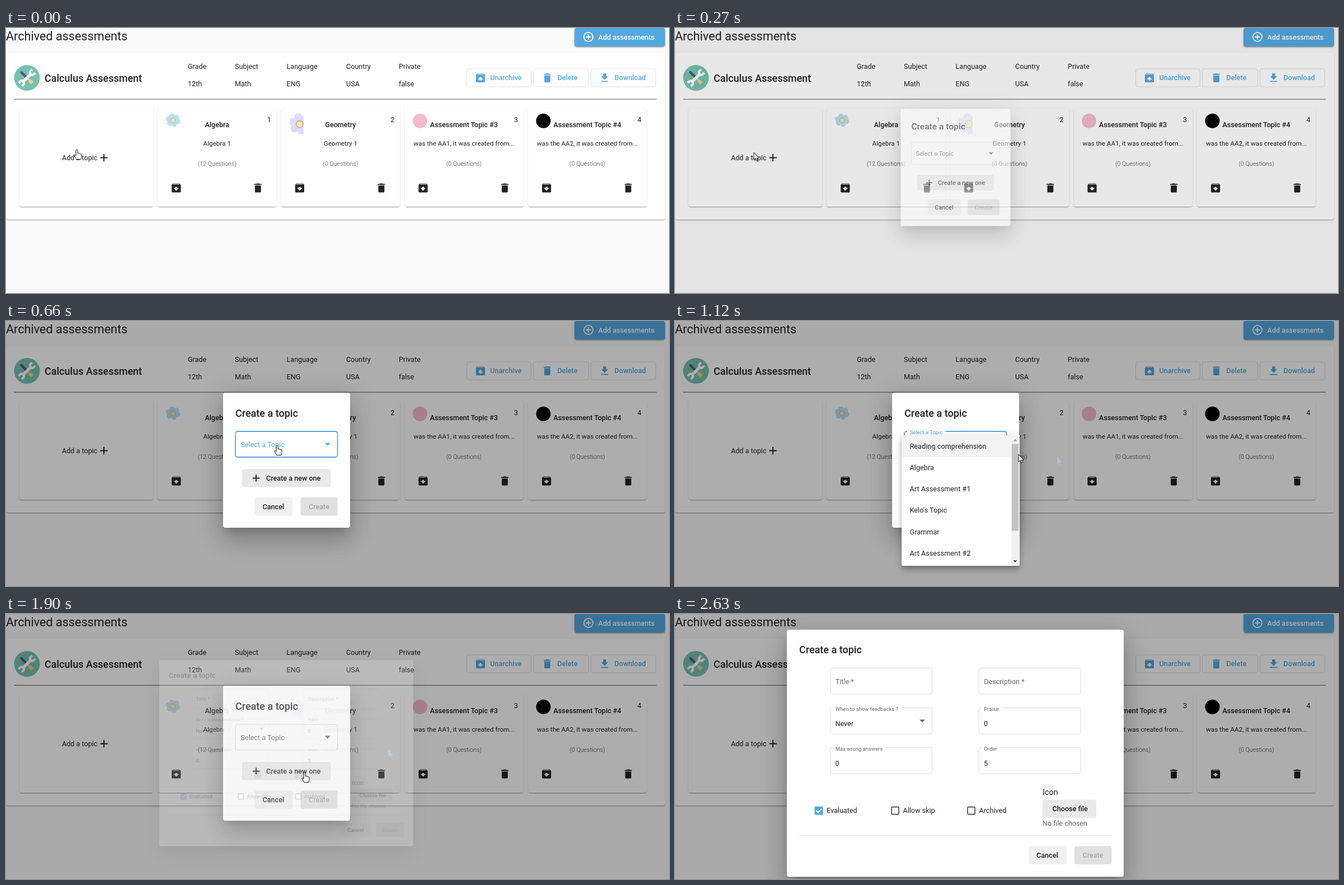
Recreate the animation shown at these times as an HTML page. Size 1185 by 473 pixels, loop 2.69 s.

```html
<!DOCTYPE html>
<html lang="en">
<head>
<meta charset="utf-8">
<title>Create a topic</title>
<style>
html, body { margin: 0; width: 100%; height: 100%; overflow: hidden; background: #fafafa; }
#stage { position: relative; width: 1185px; height: 473px; overflow: hidden; background: #fafafa; }
.box, .layer, svg { position: absolute; }
.layer { inset: 0; }
svg { left: 0; top: 0; overflow: visible; }
text { font-family: Roboto, "Liberation Sans", Arial, sans-serif; white-space: pre; }
.box { border-radius: 4px; background: #fff; }
.card { box-shadow: 0 2px 1px -1px #0003, 0 1px 1px #00000024, 0 1px 3px #0000001f; }
.raised { background: #54a8e0; box-shadow: 0 3px 1px -2px #0003, 0 2px 2px #00000024, 0 1px 5px #0000001f; }
.dialog { box-shadow: 0 11px 15px -7px #0003, 0 24px 38px 3px #00000024, 0 9px 46px 8px #0000001f; }
.panel { border-radius: 0 0 4px 4px; transform-origin: 50% 0;
  box-shadow: 0 5px 5px -3px #0003, 0 8px 10px 1px #00000024, 0 3px 14px 2px #0000001f; }
#shade { background: #000; }
</style>
</head>
<body>
<div id="stage"></div>
<script>
const BLUE = '#54a8e0', INK = '#212121', GREY = '#666';
const CRATE = 'M20.54 5.23l-1.39-1.68C18.88 3.21 18.47 3 18 3H6c-.47 0-.88.21-1.16.55L3.46 5.23C3.17 5.57 3 6.02 3 6.5V19c0 1.1.9 2 2 2h14c1.1 0 2-.9 2-2V6.5c0-.48-.17-.93-.46-1.27zM5.12 5l.81-1h12l.94 1H5.12z';
const ICONS = {
  archive: CRATE + 'M12 17.5L6.5 12H10v-2h4v2h3.5z',
  unarchive: CRATE + 'M12 9.5l5.5 5.5H14v2h-4v-2H6.5z',
  bin: 'M6 19c0 1.1.9 2 2 2h8c1.1 0 2-.9 2-2V7H6zM19 4h-3.5l-1-1h-5l-1 1H5v2h14z',
  download: 'M19 9h-4V3H9v6H5l7 7zM5 18v2h14v-2z',
  plus: 'M19 13h-6v6h-2v-6H5v-2h6V5h2v6h6z',
  plusRing: 'M13 7h-2v4H7v2h4v4h2v-4h4v-2h-4zM12 2a10 10 0 1 0 0 20 10 10 0 0 0 0-20zm0 18a8 8 0 1 1 0-16 8 8 0 0 1 0 16z'
};

// Markup helpers, all in stage coordinates
const text = (x, y, s, { size = 12.6, weight = 400, fill = INK, anchor = 'start', extra = '' } = {}) =>
  `<text x="${x}" y="${y}" font-size="${size}" font-weight="${weight}" fill="${fill}" text-anchor="${anchor}" ${extra}>${s}</text>`;
const rect = (x, y, w, h, fill, extra = 'rx="4"') =>
  `<rect x="${x}" y="${y}" width="${w}" height="${h}" fill="${fill}" ${extra}/>`;
const outline = (x, y, w, h, stroke = '#dcdcdc') => rect(x, y, w, h, 'none', `rx="4" stroke="${stroke}"`);
const circle = (x, y, r, fill, extra = '') => `<circle cx="${x}" cy="${y}" r="${r}" fill="${fill}" ${extra}/>`;
const icon = (name, x, y, fill = INK, k = .9) =>
  `<path transform="translate(${x} ${y}) scale(${k}) translate(-12 -12)" fill="${fill}" fill-rule="evenodd" d="${ICONS[name]}"/>`;
const button = (x, y, w, tx, label, bg, fill = INK) =>
  rect(x, y, w, 32.5, bg) + text(tx, y + 20.7, label, { weight: 500, fill });
const caret = (x, y, extra = '') => `<path d="M${x - 5} ${y}h10l-5 5z" fill="${GREY}" ${extra}/>`;
const box = (cls, x, y, w, h, id = '', inner = '') =>
  `<div class="box ${cls}" ${id && `id="${id}"`} style="left:${x}px;top:${y}px;width:${w}px;height:${h}px">` +
  (inner && `<svg width="${w}" height="${h}" viewBox="${x} ${y} ${w} ${h}">${inner}</svg>`) + '</div>';
const svg = (inner, id = '') => `<svg ${id && `id="${id}"`} width="1185" height="473">${inner}</svg>`;

function flower(x, y, r, petal, squash) {
  let s = '';
  for (let i = 0; i < 6; i++) {
    const a = i * Math.PI / 3 + .3;
    s += circle(x + r * Math.cos(a), y + r * squash * Math.sin(a), r * .56, petal);
  }
  return s + circle(x, y, r * .8, petal) + circle(x, y + .5, r * .5, '#f8e6ae', `stroke="#b9a78f" stroke-width="${r * .12}"`);
}

function tools() {
  return circle(37.5, 89, 23, '#76c2af') + `<g transform="translate(37.5 89)" stroke-linecap="round" fill="none">
    <g transform="rotate(-45)">
      <path d="M0-14V-1" stroke="#4f5d73" stroke-width="4.5"/><path d="M0-1V6" stroke="#e0e0d1" stroke-width="2"/>
      <path d="M0 6V14" stroke="#f5cf87" stroke-width="6" stroke-linecap="butt"/>
    </g>
    <g transform="rotate(45)" stroke="#fff">
      <path d="M0-9V9" stroke-width="5"/>
      <path d="M-4-17V-13Q-4-9.500 0-9.500T4-13V-17M-4 17V13Q-4 9.500 0 9.500T4 13V17" stroke-width="4" stroke-linecap="butt"/>
    </g></g>`;
}

function page() {
  const facts = [[325, 'Grade', '12th'], [409, 'Subject', 'Math'], [501.5, 'Language', 'ENG'], [608, 'Country', 'USA'], [702, 'Private', 'false']];
  const actions = [[823.5, 115, 'unarchive', 'Unarchive', 24.5, 42], [942.5, 99, 'bin', 'Delete', 25, 43], [1045.5, 116, 'download', 'Download', 24.5, 42]];
  const cards = [['Algebra', 'Algebra 1', 12], ['Geometry', 'Geometry 1', 0],
    ['Assessment Topic #3', 'was the AA1, it was created from...', 0], ['Assessment Topic #4', 'was the AA2, it was created from...', 0]];
  const left = i => 271.3 + i * 220.6;
  let boxes = box('raised', 1015.5, 0, 162, 32.5) + box('card', 0, 43.500, 1178, 298.500) + box('card', 24, 143, 239, 176);
  let s = text(0, 22, 'Archived assessments', { size: 21.6 }) + icon('plusRing', 1041, 16, '#fff') +
    text(1058.5, 20.7, 'Add assessments', { weight: 500, fill: '#fff' }) +
    tools() + text(69, 95.5, 'Calculus Assessment', { size: 18, weight: 500 }) +
    rect(14.5, 126.5, 1148.5, 1.500, '#8f8f8f', '') + text(100, 235.5, 'Add a topic') + icon('plus', 175, 231.5, INK, .95);
  for (const [x, head, value] of facts) s += text(x, 73, head) + text(x, 104, value);
  for (const [x, w, name, label, ix, tx] of actions)
    s += outline(x, 73, w, 32, '#e0e0e0') + icon(name, x + ix, 89, BLUE) + text(x + tx, 93.300, label, { weight: 500, fill: BLUE });
  cards.forEach(([head, sub, count], i) => {
    const x = left(i), mid = { anchor: 'middle' };
    boxes += box('card', x, 143, 212, 176);
    s += text(x + 106, 177, head, { ...mid, weight: 500 }) + text(x + 106, 210.3, sub, { ...mid, size: 11.7 }) +
      text(x + 106, 246, `(${count} Questions)`, { ...mid, size: 10.8, weight: 300, fill: '#444' }) +
      text(x + 199, 167.500, i + 1, mid) + icon('archive', x + 33, 285.5) + icon('bin', x + 179, 285.500);
  });
  s += flower(298.5, 164.500, 8.5, '#b8e0f2', .85) +
    '<clipPath id="cut"><path d="M507 153h25v36h-25z"/></clipPath>' +
    `<g clip-path="url(#cut)">${flower(525, 171, 12.5, '#dedcfb', 1)}</g>` +
    circle(740, 165.7, 13, '#f4bbcf') + circle(960.5, 165.7, 13, '#000');
  return `<div class="layer">${boxes}${svg(s)}</div>`;
}

function picker() {
  return box('dialog', 388, 127.5, 226.5, 241.500, 'picker',
    text(410, 170, 'Create a topic', { size: 18, weight: 500 }) +
    rect(410, 196.500, 182.500, 46, 'none', 'id="field" rx="4"') +
    rect(415, 194, 69, 5, '#fff', 'id="notch"') +
    text(0, 0, 'Select a Topic', { extra: 'id="label"' }) + caret(575, 217, 'id="caret"') +
    button(422, 263.500, 158.500, 465, 'Create a new one', '#e9e9e9') + icon('plus', 447, 280) +
    button(444, 314.500, 68, 458.5, 'Cancel', '#f0f0f0') + button(526.500, 314.500, 66, 541, 'Create', '#e0e0e0', '#a6a6a6'));
}

function options() {
  const names = ['Reading comprehension', 'Algebra', 'Art Assessment #1', "Kelo's Topic", 'Grammar', 'Art Assessment #2'];
  return box('panel', 405, 204, 210.500, 233, 'options',
    rect(405, 204, 195.500, 38.500, '#f3f3f3', '') +
    names.map((n, i) => text(419.5, 227.7 + i * 38.25, n, { extra: 'letter-spacing=".08"' })).join('') +
    rect(600.5, 204, 15, 233, '#f1f1f1', '') + rect(602, 219.500, 12, 155, '#c1c1c1', '') +
    '<path d="M604.500 214.500h7l-3.500-4z" fill="#a3a3a3"/><path d="M604.500 427h7l-3.500 4z" fill="#404040"/>');
}

function form() {
  const fields = [[277.5, 96.5, 'Title *'], [543, 96.5, 'Description *'], [277.5, 167.5, 'When to show feedbacks ?', 'Never', 123],
    [543, 167.5, 'Praise', '0', 36], [277.5, 238.500, 'Max wrong answers', '0', 95], [543, 238.500, 'Order', '5', 33]];
  const checks = [[249.5, 'Evaluated'], [386, 'Allow skip'], [522, 'Archived']];
  let s = text(222, 70.3, 'Create a topic', { size: 18, weight: 500 });
  for (const [x, y, label, value, gap] of fields) {
    s += outline(x, y, 182, 46.5);
    s += value
      ? rect(x + 4.5, y - 1, gap, 2, '#fff', '') + text(x + 9.3, y + 5.3, label, { size: 9.45, fill: GREY }) + text(x + 9, y + 32, value)
      : text(x + 9.3, y + 28.6, label, { fill: GREY });
  }
  s += caret(442, 188.5);
  checks.forEach(([x, label], i) => {
    s += i ? rect(x + 1, 344.500, 13, 13, '#fff', 'rx="1.500" stroke="#555" stroke-width="1.800"')
      : rect(x, 343.500, 15, 15, BLUE, 'rx="2"') + `<path d="M${x + 3} 351l3.200 3.200 6.200-6.400" fill="none" stroke="#fff" stroke-width="1.900"/>`;
    s += text(x + 21.5, 355, label);
  });
  return box('dialog', 200, 28, 602, 440.500, 'form', s +
    text(657, 323, 'Icon', { size: 14.4 }) + button(657, 331.500, 96, 674.5, 'Choose file', '#e9e9e9') +
    text(657, 378.3, 'No file chosen', { fill: GREY }) + rect(222, 395, 559, 1, '#e0e0e0', '') +
    button(632, 414.300, 68, 646, 'Cancel', '#f0f0f0') + button(714, 414.300, 66.500, 728.5, 'Create', '#e0e0e0', '#a6a6a6'));
}

const ARROW = 'M0 0V13.500L3.100 10.700 5.200 15.300 7.100 14.500 5.100 10H9.300z';
const HAND = 'M-2 1.500Q-2 0-.5 0T1 1.500V6.500Q3 5.600 3.800 7 5.600 6.300 6.200 7.800 8 7.500 8 9.300V12.500Q8 15 6.600 17.500H-1.200Q-2.500 14.500-5 11.500-5.600 9.600-4 9.600-3 9.800-2 11z';

document.getElementById('stage').innerHTML = page() + '<div class="layer" id="shade"></div>' +
  svg(`<path transform="translate(683 242)" d="${ARROW}" fill="#a9c3d3"/>`, 'trail') +
  picker() + options() + form() +
  svg('<path id="cursor" fill="#fff" stroke="#111" stroke-linejoin="round"/>');

const $ = id => document.getElementById(id);
const [shade, trail, pickerBox, optionBox, formBox, cursor, field, notch, label, arrow] =
  ['shade', 'trail', 'picker', 'options', 'form', 'cursor', 'field', 'notch', 'label', 'caret'].map($);

// Timing
const LOOP = 2690, TICK = LOOP / 41;
const OPEN = 228, FOCUS = 640, EXPAND = 815, COLLAPSE = 1380, SWAP = 1895;

const clamp = v => Math.min(1, Math.max(0, v));
function bezier(x1, y1, x2, y2) {
  const at = (a, b, u) => 3 * a * u * (1 - u) ** 2 + 3 * b * u * u * (1 - u) + u ** 3;
  return x => {
    x = clamp(x);
    if (x === 0 || x === 1) return x;
    let lo = 0, hi = 1;
    for (let i = 0; i < 24; i++) {
      const m = (lo + hi) / 2;
      if (at(x1, x2, m) < x) lo = m; else hi = m;
    }
    return at(y1, y2, lo);
  };
}
const enter = bezier(0, 0, .2, 1), swift = bezier(.25, .8, .25, 1);

// Pointer path: tick, x, y
const PATH = [[0, 127, 217], [1, 131, 210], [2, 141, 221], [4, 141, 222], [5, 150, 223], [7, 330, 232], [9, 452, 229], [10, 485, 222],
  [13, 487, 223], [16, 683, 242], [17, 614, 238], [20, 620, 161], [21, 614, 172], [23, 533, 264], [28, 534, 283], [31, 534, 283],
  [37, 743, 431], [38, 743, 431], [39, 752, 437], [41, 752, 437]];
const isHand = n => n < 4 || (n >= 8 && n < 15) || (n >= 23 && n < 30);

function pointer(n) {
  const i = PATH.findIndex(p => p[0] > n), [a, x, y] = PATH[i - 1], [b, x2, y2] = PATH[i], k = (n - a) / (b - a);
  return `translate(${x + (x2 - x) * k} ${y + (y2 - y) * k})`;
}

function show(el, opacity, transform = '') {
  el.style.visibility = opacity > 0 ? 'visible' : 'hidden';
  el.style.opacity = opacity;
  el.style.transform = transform;
}
const pop = p => `scale(${.7 + .3 * p})`;

function render(ms) {
  const n = Math.min(40, Math.floor(ms / TICK + .13)), t = n * TICK;

  show(shade, .32 * swift((t - OPEN) / 400));
  const p = enter((t - OPEN) / 150), q = enter((t - SWAP) / 150);
  show(pickerBox, p * clamp(1 - (t - SWAP) / 75), pop(p));
  show(formBox, q, pop(q));

  const e = enter((t - EXPAND) / 120);
  show(optionBox, e * clamp(1 - (t - COLLAPSE) / 100), `scaleY(${.8 + .2 * e})`);
  show(trail, n >= 17 && n < 30 ? 1 : 0);

  const focus = t >= FOCUS && t < COLLAPSE, tone = focus ? BLUE : GREY;
  const f = swift((t - EXPAND) / 400) - swift((t - COLLAPSE) / 400);
  field.setAttribute('stroke', focus ? BLUE : '#dcdcdc');
  field.setAttribute('stroke-width', focus ? 1.8 : 1);
  notch.setAttribute('opacity', focus && t >= EXPAND ? 1 : 0);
  label.setAttribute('transform', `translate(419.5 ${224.5 - 23 * f}) scale(${1 - .25 * f})`);
  label.setAttribute('fill', tone);
  arrow.setAttribute('fill', tone);

  cursor.setAttribute('d', isHand(n) ? HAND : ARROW);
  cursor.setAttribute('transform', pointer(n));
  cursor.setAttribute('opacity', n < 40 ? 1 : 0);
}

const start = performance.now();
function frame() {
  render((performance.now() - start) % LOOP);
  requestAnimationFrame(frame);
}
frame();
</script>
</body>
</html>
```
